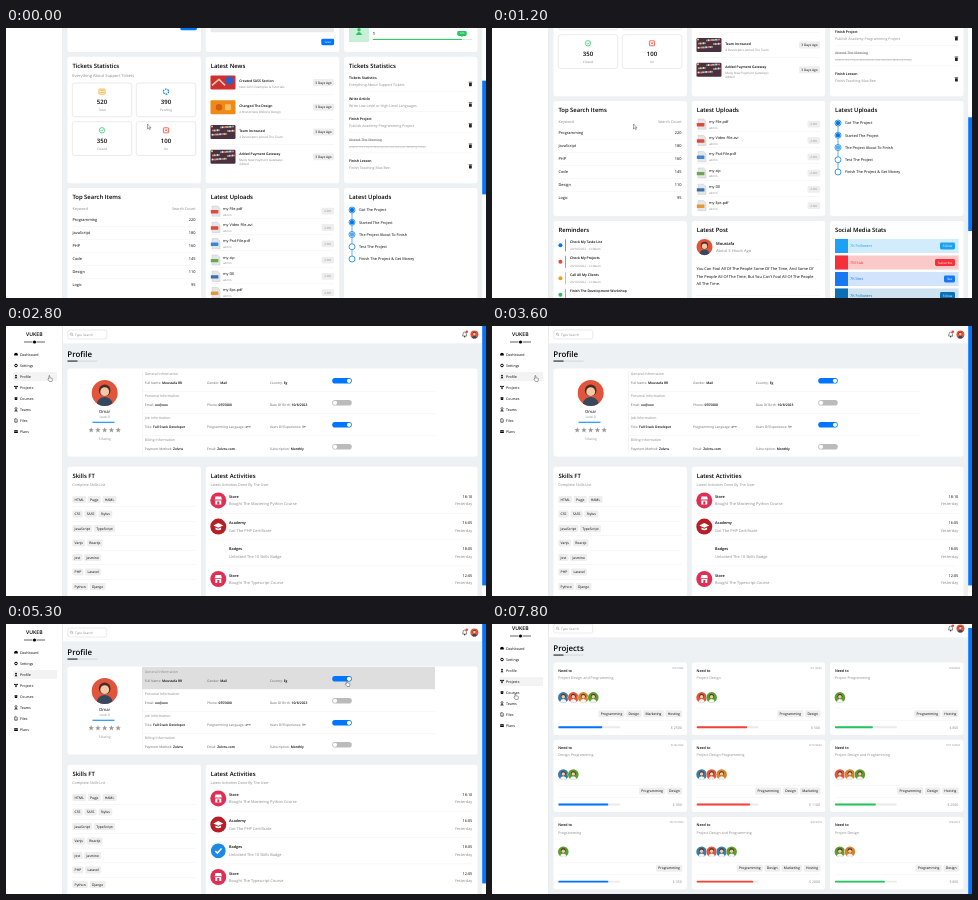
Write an HTML page that moves like this. It is 480 px wide and 270 px high and loops after 8000 ms.

```html
<!DOCTYPE html>
<html lang="en">
<head>
<meta charset="utf-8">
<title>Admin dashboard</title>
<style>
html, body { margin: 0; width: 100%; height: 100%; overflow: hidden; background: #fff; }
svg { display: block; width: 480px; height: 270px; }
text { font-family: "Open Sans", sans-serif; text-rendering: geometricPrecision; }
</style>
</head>
<body>
<svg id="stage" viewBox="0 0 480 270"></svg>
<script>
const BLUE = '#0075ff', RED = '#f44336', ORANGE = '#f59e0b', GREEN = '#22c55e', GREY = '#888', LINE = '#eee';
const COLS = [61.5, 199.8, 338.1], CARD_W = 133.4;
const FACES = { b: '#3a7ca5', r: '#e2553d', o: '#d9822b', g: '#5a9e2f' };
const pen = document.createElement('canvas').getContext('2d');

const textWidth = (s, size, weight = 400) => {
  pen.font = `${weight} 100px "Open Sans", sans-serif`;
  return pen.measureText(s).width * size / 100;
};
// y is the middle of the capitals
const text = (x, y, s, size = 4, fill = '#000', weight = 400, anchor = 'start') =>
  `<text x="${x}" y="${y + size * .36}" font-size="${size}" fill="${fill}" font-weight="${weight}" text-anchor="${anchor}">${s}</text>`;
const bold = (x, y, s, size = 3.4) => text(x, y, s, size, '#000', 600);
const grey = (x, y, s, size = 3.3) => text(x, y, s, size, GREY);
const mid = (x, y, s, size, fill = '#000', weight = 400) => text(x, y, s, size, fill, weight, 'middle');
const end = (x, y, s, size, fill = '#000', weight = 400) => text(x, y, s, size, fill, weight, 'end');
const rect = (x, y, w, h, fill, r = 0, more = '') =>
  `<rect x="${x}" y="${y}" width="${w}" height="${h}" fill="${fill}" rx="${r}" ${more}/>`;
const dot = (x, y, r, fill, more = '') => `<circle cx="${x}" cy="${y}" r="${r}" fill="${fill}" ${more}/>`;
const path = (d, stroke, width = .8, fill = 'none') =>
  `<path d="${d}" stroke="${stroke}" stroke-width="${width}" fill="${fill}"/>`;
const rule = (x, y, w) => rect(x, y, w, .3, '#e6e6e6');
const card = (x, y, w, h) => rect(x, y, w, h, '#fff', 2.5);
const cardTitle = (x, y, s) => bold(x + 4.9, y, s, 5.9);
const pill = (x, y, w, h, fill, s, color = '#fff', size = 3.2) =>
  rect(x, y - h / 2, w, h, fill, 1.4) + mid(x + w / 2, y, s, size, color);
const each = (list, fn) => list.map(fn).join('');

const avatar = (x, y, r, fill, body = '#f3f3f3') =>
  `<g transform="translate(${x} ${y}) scale(${r})">` + dot(0, 0, 1, fill) +
  `<path d="M-.6 .8Q-.5 .3 0 .3Q.5 .3 .6 .8A1 1 0 0 1 -.6 .8" fill="${body}"/>` +
  dot(0, -.2, .45, '#4a2c24') + dot(0, -.1, .34, '#f3c9a5') + '</g>';
const team = (x, y, r, step, codes) =>
  each([...codes], (c, i) => dot(x + i * step, y, r, '#fff') + avatar(x + i * step, y, r - .4, FACES[c]));
const chips = (x, y, list, size = 3.4, fromRight = false) => {
  const widths = list.map(s => textWidth(s, size) + 4.6);
  if (fromRight) x -= widths.reduce((a, b) => a + b + 1.6, -1.6);
  return each(list, (s, i) => {
    const p = pill(x, y, widths[i], 7, '#eee', s, '#000', size);
    x += widths[i] + 1.6;
    return p;
  });
};
const heading = s => bold(61.3, 28, s, 7.9) + rect(61.5, 34.6, 30, .9, '#ccd1d6') + rect(61.5, 34.6, 10, .9, '#000');

function sidebar() {
  const names = ['Dashboard', 'Settings', 'Profile', 'Projects', 'Courses', 'Teams', 'Files', 'Plans'];
  const icons = [
    path('M-1.8 1V0A1.8 1.8 0 0 1 1.8 0V1Z', 'none', 0, '#000'),
    dot(0, 0, 1.3, 'none', 'stroke="#000" stroke-width="1"'),
    dot(0, -.8, .9, '#000') + path('M-1.4 1.7Q0 -.7 1.4 1.7Z', 'none', 0, '#000'),
    path('M-1.2 -1.1H1.2L0 1.1Z', '#000', .6) + dot(-1.2, -1.1, .7, '#000') + dot(1.2, -1.1, .7, '#000') + dot(0, 1.1, .7, '#000'),
    path('M-2.2 -.5L0 -1.5L2.2 -.5L0 .5ZM-1.2 .5V1.4H1.2V.5', 'none', 0, '#000'),
    dot(0, -.9, 1, 'none', 'stroke="#000" stroke-width=".6"') + path('M-1.4 1.6Q0 -.2 1.4 1.6Z', '#000', .6),
    path('M-1.2 -1.7H.5L1.2 -.9V1.7H-1.2Z', '#000', .6),
    rect(-1.9, -1.4, 3.8, 2.8, '#000', .4) + rect(-1.9, -.7, 3.8, .6, '#fff')
  ];
  return rect(0, 0, 57, 700, '#fff') + rect(56.3, 0, .7, 700, '#e2e4e6') +
    mid(28.3, 8.3, 'VUKEB', 5.1, '#000', 600) + rect(18, 15.7, 21, .6, '#000') +
    dot(28.5, 16, 2.2, '#fff') + dot(28.5, 16, 1.6, '#000') +
    `<g id="active">${rect(7.2, 24, 44, 9, '#f3f3f3', 1.5)}</g>` +
    each(names, (s, i) => `<g transform="translate(10 ${28.5 + 11 * i})">${icons[i]}</g>` +
      text(14, 28.5 + 11 * i, s, 3.6, '#000', 500));
}

function header() {
  return rect(57, 0, 420, 17.3, '#fff') + rect(61.8, 4, 39, 9, '#fff', 2, 'stroke="#ccc" stroke-width=".4"') +
    dot(65.4, 8.2, 1.1, 'none', 'stroke="#888" stroke-width=".5"') + path('M66.2 9L67.2 10', GREY, .5) +
    grey(69, 8.5, 'Type Search', 3.2) +
    path('M456.5 10Q457 9.3 457 8A1.7 1.9 0 0 1 460.4 8Q460.4 9.3 460.9 10Z', '#222', .5) + dot(458.7, 10.8, .7, '#222') +
    dot(460.8, 5.8, 1.3, RED) + avatar(468.4, 8.5, 4, '#e2553d', '#34495e');
}

function welcome() {
  const [x] = COLS;
  const person = (px, py, c, legs) => dot(px, py, 1.5, '#e8b08f') + rect(px - 2, py + 1.6, 4, 9, c, 1.5) +
    rect(px - 1.6, py + 10, 1.4, 76.5 - py - 10, legs) + rect(px + .3, py + 10, 1.4, 76.5 - py - 10, legs);
  return card(x, 42.6, CARD_W, 106.5) + rect(x, 42.6, CARD_W, 34.4, '#dfe0e1', 2.5) +
    cardTitle(x, 52, 'Welcome') + grey(66.3, 60.3, 'Omar', 3.3) +
    person(145.5, 54, '#2f6fb0', '#23395d') + person(154, 56, '#3b82c4', '#23395d') +
    rect(149, 64, 28, 1, '#23395d') + path('M152 65L150 76.5M174 65L176 76.5', '#23395d', .6) +
    rect(160, 60, 6, 4, '#fff') + person(172.5, 54, '#d0524a', '#23395d') + person(183, 51.5, '#2f6fb0', '#23395d') +
    path('M146 57L152 62M182 55L175 59', '#e8b08f', 1) +
    dot(74, 78, 7.4, '#fff') + avatar(74, 78, 6.6, '#e2553d', '#34495e') +
    each([[87, 'Moustafa', 'Developer'], [128, '4', 'Projects'], [169, '$500', 'Earned']],
      ([cx, a, b]) => mid(cx, 100, a, 3.9) + mid(cx, 107.3, b, 3.3, GREY)) +
    pill(174.3, 123.7, 16.6, 7, BLUE, 'Profile', '#fff', 3.5);
}

function draft() {
  const x = COLS[1];
  return card(x, 42.6, CARD_W, 106.5) + cardTitle(x, 57, 'Quick Draft') +
    text(204.6, 69, 'Write A Draft For Your Ideas') +
    rect(204.5, 75.5, 123.5, 9, '#e9e9e9', 1.4) + grey(207, 80, 'Title', 3.2) +
    rect(204.5, 89.8, 123.5, 39.5, '#e9e9e9', 1.4) + grey(207, 94, 'write here', 3.2) +
    pill(315.3, 139, 12.8, 6.4, BLUE, 'Save', '#fff', 3);
}

function targets() {
  const x = COLS[2];
  const rows = [[68.5, 'Money', '$82.41', BLUE, '#c6e0ff', 446, '80%', '$'],
    [93.5, 'projects', '4', ORANGE, '#fce7c3', 431.5, '65%', '$'],
    [118.5, 'Team', '1', GREEN, '#c9f0d7', 456, '90%', '']];
  return card(x, 42.6, CARD_W, 106.5) + cardTitle(x, 51.8, 'Yearly Targets') +
    grey(343, 61.2, 'Everything About Support Tickets', 4) +
    each(rows, ([y, label, value, c, tint, stop, pct, sign]) =>
      rect(343, y, 20, 20.5, tint) +
      (sign ? mid(353, y + 10.2, sign, 6, c, 600)
        : dot(353, y + 8.2, 1.7, c) + path(`M349.8 ${y + 13.5}Q353 ${y + 7.5} 356.2 ${y + 13.5}Z`, 'none', 0, c)) +
      grey(366.8, y + 5.7, label, 3.4) + bold(366.8, y + 12.3, value, 4) +
      rect(366.8, y + 17.4, 99.6, 1, tint) + rect(366.8, y + 17.4, stop - 366.8, 1, c) +
      pill(stop - 4.7, y + 12, 9.4, 5, c, pct, '#fff', 2.6) +
      path(`M${stop - 1} ${y + 14.3}h2l-1 1.4Z`, 'none', 0, c));
}

function tickets() {
  const x = COLS[0];
  const icon = [
    rect(-3, -2.5, 6, 5, 'none', .6, `stroke="${ORANGE}" stroke-width=".8"`) + path('M-1.7 -.9H1.8M-1.7 .8H1.8', ORANGE, .8),
    dot(0, 0, 2.6, 'none', `stroke="${BLUE}" stroke-width="1.2" stroke-dasharray="1.7 1"`),
    dot(0, 0, 2.7, 'none', `stroke="${GREEN}" stroke-width=".7"`) + path('M-1.2 0L-.3 .9L1.3 -.9', GREEN),
    rect(-2.6, -2.5, 5.2, 5, 'none', .6, `stroke="${RED}" stroke-width=".8"`) + path('M-1 -1L1 1M1 -1L-1 1', RED)
  ];
  return card(x, 153.8, CARD_W, 126.4) + cardTitle(x, 163.2, 'Tickets Statistics') +
    grey(66.3, 172.5, 'Everything About Support Tickets', 4) +
    each([['520', 'Total'], ['390', 'Pending'], ['350', 'Closed'], ['100', 'Un']], ([n, label], i) => {
      const bx = 66.3 + i % 2 * 64, y = 180 + (i > 1) * 38.7;
      return rect(bx, y, 59.5, 33.8, '#fff', 2.5, 'stroke="#ccc" stroke-width=".4"') +
        `<g transform="translate(${bx + 29.7} ${y + 8.6})">${icon[i]}</g>` +
        mid(bx + 29.7, y + 19, n, 6, '#000', 600) + mid(bx + 29.7, y + 26.7, label, 3.2, GREY);
    });
}

function news() {
  const x = COLS[1];
  const rows = [['Created SASS Section', 'New SASS Examples & Tutorials'], ['Changed The Design', 'A Brand New Website Design'],
    ['Team Increased', '4 Developers Joined The Team'], ['Added Payment Gateway', 'Many New Payment Gateways', 'Added']];
  const hues = ['#e9c46a', '#d95f5f', '#5fa8a0', '#b58ac9', '#e8e0d0'];
  const thumb = (i, y) => rect(204.5, y - 7, 25, 14, ['#d02f2f', '#ef8a17', '#4b3040', '#4b3040'][i], 1.2) +
    (i == 0 ? dot(223.5, y - 2, 4, '#2d5fc4') + path(`M206 ${y + 3}L213 ${y - 3}L219 ${y + 3}`, '#f4c8b8', 1.6)
      : i == 1 ? dot(213, y, 3.2, '#d35d12') + rect(219, y - 3, 6, 6, '#f9bf62', 1)
      : each([...Array(30)], (_, k) => dot(206 + k * 7 % 22.5, y - 5.5 + k * 3.7 % 11, 1, hues[k % 5])));
  return card(x, 153.8, CARD_W, 126.4) + cardTitle(x, 163.2, 'Latest News') +
    each(rows, ([a, b, c], i) => {
      const y = 179.4 + 24.8 * i;
      return thumb(i, y) + bold(233.2, y - 1.2 - (c ? 1.7 : 0), a, 3.4) + grey(233.2, y + 4.4 - (c ? 1.5 : 0), b, 3.1) +
        (c ? grey(233.2, y + 7, c, 3.1) + '' : rule(204.5, y + 12.3, 123.5)) + pill(307, y, 21, 7, '#eee', '3 Days Ago', '#000', 3.2);
    });
}

function todo() {
  const x = COLS[2];
  const rows = [['Tickets Statistics', 'Everything About Support Tickets'], ['Write Article', 'Write Low Level or High Level Languages'],
    ['Finish Project', 'Publish Academy Programming Project'],
    ['Attend The Meeting', 'Attend The Project Brainstorm and Decision Meeting Today'], ['Finish Lesson', 'Finish Teaching Max Bee']];
  return card(x, 153.8, CARD_W, 126.4) + cardTitle(x, 163.2, 'Tickets Statistics') +
    each(rows, ([a, b], i) => {
      const y = 175 + 20.6 * i, done = i == 3;
      return (done ? `<g opacity=".55" text-decoration="line-through">${text(343, y, a, 3.6)}${grey(343, y + 6.7, b, 2.8)}</g>`
        : bold(343, y, a, 3.5) + grey(343, y + 7, b, 3.6)) +
        rect(463, y + 4.8, 2.8, 3.4, '#222', .4) + rect(462.6, y + 3.8, 3.6, .6, '#222') + (i < 4 ? rule(343, y + 13, 123.4) : '');
    });
}

function searches() {
  const rows = [['Programming', 220], ['JavaScript', 180], ['PHP', 160], ['Code', 145], ['Design', 110], ['Logic', 95]];
  return card(COLS[0], 285, CARD_W, 115) + cardTitle(COLS[0], 294, 'Top Search Items') +
    grey(66.5, 305.7, 'Keyword', 3.8) + end(189.5, 305.7, 'Search Count', 3.8, GREY) +
    each(rows, ([a, n], i) => text(66.5, 317 + 13 * i, a, 3.9) + end(189.5, 317 + 13 * i, n, 3.9) +
      (i < 5 ? rule(66.5, 323.5 + 13 * i, 123) : ''));
}

function uploads() {
  const names = ['my File.pdf', 'my Video File.avi', 'my Psd-File.pdf', 'my zip', 'my Dll', 'my Eps.pdf'];
  const hue = ['#e2483d', '#e2483d', '#3a86d6', '#6aa84f', '#3f6fa8', '#e39a35'];
  return card(COLS[1], 285, CARD_W, 115) + cardTitle(COLS[1], 294, 'Latest Uploads') +
    each(names, (s, i) => {
      const y = 305.5 + 16.3 * i;
      return path(`M206 ${y - 2.5}h5.5l2.5 2.4v7.8h-8Z`, '#aaa', .3, '#e4e7ea') + rect(204.8, y + 1.5, 7.6, 3.4, hue[i], .4) +
        text(217, y, s, 3.8) + grey(217, y + 6, 'admin', 2.9) + pill(315.5, y + 2.7, 12.6, 6.8, '#eee', '2.9m', GREY, 3) +
        (i < 5 ? rule(204.5, y + 9.6, 123.5) : '');
    });
}

function steps() {
  const rows = ['Got The Project', 'Started The Project', 'The Project About To Finish', 'Test The Project', 'Finish The Project & Get Money'];
  return card(COLS[2], 285, CARD_W, 115) + cardTitle(COLS[2], 294, 'Latest Uploads') + rect(345.7, 307, .6, 49, BLUE) +
    each(rows, (s, i) => dot(346, 307 + 12.25 * i, 3, '#fff', 'stroke="#0a85e8" stroke-width=".8"') +
      (i < 3 ? dot(346, 307 + 12.25 * i, 2.2, i < 2 ? '#0a75e0' : '#57a8f2') : '') + text(353, 307 + 12.25 * i, s, 3.8));
}

function reminders() {
  const rows = [['Check My Tasks List', BLUE], ['Check My Projects', RED], ['Call All My Clients', ORANGE], ['Finish The Development Workshop', GREEN]];
  return card(COLS[0], 405, CARD_W, 90) + cardTitle(COLS[0], 414, 'Reminders') +
    each(rows, ([s, c], i) => {
      const y = 429.3 + 16.5 * i;
      return dot(68.4, y, 2, c) + rect(73, y - 6, .7, 12, c) + bold(78, y - 3.6, s, 3.4) + grey(78, y + 3.8, '20/10/2022 - 12:00am', 3);
    });
}

function post() {
  const lines = ['You Can Fool All Of The People Some Of The Time, And Some Of', 'The People All Of The Time, But You Can\'t Fool All Of The People', 'All The Time.'];
  return card(COLS[1], 405, CARD_W, 90) + cardTitle(COLS[1], 414, 'Latest Post') +
    avatar(212.5, 431, 8, '#e2553d', '#34495e') + bold(224, 428, 'Moustafa', 4) + grey(224, 434.7, 'About 3 Hours Ago', 4) +
    rule(204.5, 443.5, 123.5) + each(lines, (s, i) => text(204.5, 453 + 7.2 * i, s, 3.95)) + rule(204.5, 479.5, 123.5) +
    path('M206.3 487.8L204.7 486Q204.7 484.2 206.3 485.2Q207.9 484.2 207.9 486Z', GREY, .4) + grey(210, 486.3, '1.8k', 3.5) +
    dot(317.5, 486.2, 1.6, 'none', 'stroke="#888" stroke-width=".5"') + end(328, 486.3, '500', 3.5, GREY);
}

function social() {
  const rows = [['#1da1f2', '#d2ecfc', '7K Followers', 'Follow', 15], ['#f5303a', '#fcc9c9', '7M Sub', 'Subscribe', 20],
    ['#1877f2', '#d1e4fc', '7K likes', 'like', 11], ['#0a6fb5', '#cee2f0', '7K Followers', 'Follow', 15]];
  return card(COLS[2], 405, CARD_W, 90) + cardTitle(COLS[2], 414, 'Social Media Stats') +
    each(rows, ([c, tint, s, label, w], i) => {
      const y = 423 + 16.5 * i;
      return rect(343, y, 123.6, 14, tint) + rect(343, y, 13, 14, c) + text(358, y + 7, s, 3.8, c) +
        pill(463 - w, y + 7, w, 6.8, c, label, '#fff', 3.2);
    });
}

function projectTable() {
  const xs = [70, 161.3, 230.6, 301.5, 344, 397.5];
  const state = { Pending: [ORANGE, 20], 'In Progress': [BLUE, 24.5], Completed: [GREEN, 24.5], Rejected: [RED, 23] };
  const first = ['Bureau Encyclora', '10 May 2022', 'Bureau', '$1300'];
  const rows = [[...first, 'bgr', 'Pending'], ['Moustafa El', '12 May 2021', 'VK Company', '$1200', 'bgr', 'In Progress'],
    ['Omar Salef', '05 sep 2022', 'Tilmo', '$1800', 'rb', 'Completed'], [...first, 'bgr', 'Completed'],
    [...first, 'gr', 'Rejected'], [...first, 'gr', 'Completed']];
  return card(61.5, 500, 410, 136) + cardTitle(61.5, 509, 'projects') + rect(66.3, 518, 400, 12.6, '#ececec') +
    each(['Name', 'Finish Date', 'Client', 'Price', 'Team', 'Status'], (s, i) => bold(xs[i], 524.3, s, 3.6)) +
    each(rows, (row, i) => {
      const y = 539 + 16.7 * i, [c, w] = state[row[5]];
      return each(row.slice(0, 4), (s, k) => text(xs[k], y, s, 3.6)) + team(348.4, y, 4.3, 3.8, row[4]) +
        pill(397.5, y, w, 7, c, row[5], '#fff', 3.4) + rule(66.3, y + 8.3, 400);
    });
}

function profileInfo() {
  const rows = [
    ['General Information', 1, 'Full Name: |Moustafa RR', 'Gender: |Mail', 'Country: |Eg'],
    ['Personal Information', 0, 'Email: |oo@oox', 'Phone: |0555000', 'Date Of Birth: |10/8/2023'],
    ['Job Information', 1, 'Title: |Full Stack Developer', 'Programming Language: |c++', 'Years Of Experience: |1+'],
    ['Billing Information', 0, 'Payment Method: |Zolvru', 'Email: |Zolvru.com', 'Subscription: |Monthly']];
  return card(61.5, 42.6, 410, 88) + `<g id="hover">${rect(136, 43, 293, 22, '#dedede')}</g>` +
    avatar(98.7, 67, 13, '#e2553d', '#34495e') + mid(98.7, 85, 'Omar', 4.2) + mid(98.7, 90.8, 'Level 0', 3.3, GREY) +
    rect(86.5, 95.7, 22, 1.2, '#2196f3') +
    each([0, 1, 2, 3, 4], i => `<path transform="translate(${85.2 + 6.75 * i} 104)" fill="#999" d="M0 -2.7L.8 -.8L2.7 -.7L1.2 .5L1.7 2.4L0 1.3L-1.7 2.4L-1.2 .5L-2.7 -.7L-.8 -.8Z"/>`) +
    mid(98.7, 113, '5 Rating', 3.2, GREY) + rect(136, 45, .3, 83, '#ddd') +
    each(rows, ([title, on, ...cells], i) => {
      const y = 47.6 + 22 * i;
      return grey(138.8, y, title, 3.5) +
        each(cells, (s, k) => {
          const [label, value] = s.split('|');
          return text([138.8, 201, 263.7][k], y + 9.6, `<tspan fill="#666">${label}</tspan><tspan font-weight="600">${value}</tspan>`, 3.3);
        }) + rect(326.2, y + 4.4, 19.6, 5.6, on ? BLUE : '#bbb', 2.8) +
        dot(on ? 343 : 329, y + 7.2, 2.1, '#fff') + (i < 3 ? rule(136, y + 17.4, 293) : '');
    });
}

function profileLists() {
  const skills = ['HTML Pugjs HAML', 'CSS SASS Stylus', 'JavaScript TypeScript', 'Vanjs Reactjs', 'Jest Jasmine', 'PHP Laravel', 'Python Django'];
  const acts = [['Store', 'Bought The Mastering Python Course', '18:10'], ['Academy', 'Got The PHP Certificate', '16:05'],
    ['Badges', 'Unlocked The 10 Skills Badge', '18:05'], ['Store', 'Bought The Typescript Course', '12:05']];
  const shop = dot(0, 0, 8, '#df2f54') + path('M-3.6 -.8L-2.8 -4H2.8L3.6 -.8ZM-3 0H3V4H-3Z', 'none', 0, '#fff') + rect(-1, 1, 2, 3, '#df2f54');
  const cap = dot(0, 0, 8, '#b71f26') + path('M-5 -1.2L0 -3.6L5 -1.2L0 1.2ZM-2.8 .8L0 2.2L2.8 .8V2.8Q0 4.4 -2.8 2.8Z', 'none', 0, '#fff');
  const tick = `<g id="badge">${dot(0, 0, 7.4, '#1e88e5')}${path('M-3 .2L-.9 2.3L3.2 -2.2', '#fff', 1.5)}</g>`;
  return card(61.5, 140.8, CARD_W, 135) + cardTitle(61.5, 150, 'Skills FT') + grey(66.3, 159, 'Complete Skills List', 3.7) +
    each(skills, (s, i) => chips(66.3, 173.5 + 14.5 * i, s.split(' ')) + (i < 6 ? rule(66.3, 180.7 + 14.5 * i, 123.5) : '')) +
    card(COLS[1], 140.8, 271.7, 135) + cardTitle(COLS[1], 150, 'Latest Activities') +
    grey(204.5, 159, 'Latest Activities Done By The User', 3.7) +
    each(acts, ([a, b, time], i) => {
      const y = 174.4 + 26.2 * i;
      return `<g transform="translate(212.3 ${y})">${[shop, cap, tick, shop][i]}</g>` + bold(223, y - 3.7, a, 3.8) + grey(223, y + 3.5, b, 3.9) +
        end(466.3, y - 3.7, time, 3.8, '#000', 500) + end(466.3, y + 3.5, 'Yesterday', 3.9, GREY) + (i < 3 ? rule(204.5, y + 13, 262) : '');
    });
}

function projectCards() {
  const P = 'Programming', D = 'Design', M = 'Marketing', H = 'Hosting', full = 'Project Design and Programming';
  const items = [
    [full, 'brog', [P, D, M, H], 44, 2500, '9/1/2022'], ['Project Design', 'rg', [P, D], 50.5, 500, '9/1/2022'],
    ['Project Programming', 'g', [P, H], 38, 800, '9/3/2022'],
    ['Design Programming', 'bg', [P, D], 50, 900, '9/14/2022'], ['Project Design Programming', 'bro', [P, D, M], 53.5, 1100, '9/13/2022'],
    [full, 'rog', [P, D, H], 41, 2500, '10/11/2022'],
    ['Programming', 'g', [P], 50, 350, '10/11/2022'], [full, 'brbg', [P, D, M, H], 56.5, 2000, '9/9/2019'],
    ['Project Design', 'go', [P, D], 50, 800, '9/9/2019']];
  return each(items, ([s, faces, tags, done, price, date], i) => {
    const c = i % 3, x = COLS[c], y = 42.6 + 77.2 * (i / 3 | 0), l = x + 4.8, r = x + 128.7;
    return card(x, y, CARD_W, 72.3) + bold(l, y + 7.9, 'Need to', 3.6) + end(r + 1.3, y + 5.2, date, 2.7, GREY) +
      grey(l, y + 15.3, s, 3.6) + team(x + 9.8, y + 34.8, 5.7, 10, faces) + rule(l, y + 45.3, 124) +
      chips(r, y + 51.2, tags, 3.4, true) + rule(l, y + 57.5, 124) +
      rect(l, y + 63.7, 62, 1.9, '#eaeaea', .9) + rect(l, y + 63.7, done, 1.9, [BLUE, RED, GREEN][c], .9) +
      end(r - .5, y + 64.7, '$ ' + price, 3.5, GREY);
  });
}

const views = [
  heading('Dashboard') + welcome() + draft() + targets() + tickets() + news() + todo() + searches() + uploads() + steps() +
    reminders() + post() + social() + projectTable(),
  heading('Profile') + profileInfo() + profileLists(),
  heading('Projects') + projectCards()
];
const $ = id => document.getElementById(id);
$('stage').innerHTML = rect(0, 0, 480, 270, '#edf1f4') +
  `<g id="page">${sidebar()}${header()}${each(views, (v, i) => `<g id="view${i}">${v}</g>`)}</g>` +
  rect(476.2, 0, 3.8, 270, '#fff') + `<rect id="thumb" x="476.2" width="3.8" fill="${BLUE}"/>` +
  `<g id="cursor"><g id="arrow">${path('M0 0V5L1.2 3.9L2 5.6L2.8 5.2L2 3.6H3.5Z', '#222', .4, '#fff')}</g>` +
  `<g id="hand">${path('M.5 0Q1.2 -.2 1.3 .6V2.3L3.6 2.8Q4 3 3.9 4L3.4 6H1L-.8 3.6Q-.6 2.8 .4 3.6V.5Z', '#222', .4, '#fff')}</g></g>`;

// rows of [time, value, ...], linear in between
function track(keys, t) {
  const k = keys.findIndex(key => key[0] > t);
  if (k < 0) return keys.at(-1).slice(1);
  if (!k) return keys[0].slice(1);
  const a = keys[k - 1], b = keys[k], p = (t - a[0]) / (b[0] - a[0]);
  return a.slice(1).map((v, i) => v + (b[i + 1] - v) * p);
}
const scrolls = [
  [[0, 125], [600, 371], [900, 371], [1600, 0]],
  [[3700, 0], [4000, 11], [4600, 11], [4900, 0]],
  [[6900, 0], [7200, 4]]
];
const pointer = [[0, 141.5, 96], [1500, 141.5, 96], [2000, 33, 39.5], [2200, 33, 39.5], [2600, 42.5, 49.5], [3800, 42.5, 49.5],
  [4500, 200, 95], [5100, 340, 56.5], [5400, 340, 56.5], [5900, 190, 72], [6300, 45, 54], [6500, 31.5, 63.5], [6900, 31.5, 63.5], [7800, 22.5, 69.5]];
const heights = [641, 281, 274], activeItem = [0, 2, 3];
const show = (id, on) => $(id).setAttribute('display', on ? 'inline' : 'none');

function draw() {
  const now = performance.now() % 8000, t = now - now % 100;
  const view = t < 2600 ? 0 : t < 6400 ? 1 : 2;
  const [scroll] = track(scrolls[view], t), [x, y] = track(pointer, t);
  const onLink = x < 52 || t >= 5000 && t < 5500;
  views.forEach((_, i) => show('view' + i, i == view));
  show('hover', t >= 5000 && t < 5500);
  show('badge', t >= 3800);
  show('hand', onLink);
  show('arrow', !onLink);
  $('page').setAttribute('transform', `translate(0 ${-scroll})`);
  $('active').setAttribute('transform', `translate(0 ${11 * activeItem[view]})`);
  $('thumb').setAttribute('y', scroll * 270 / heights[view]);
  $('thumb').setAttribute('height', 270 * 270 / heights[view]);
  $('cursor').setAttribute('transform', `translate(${x} ${y})`);
  requestAnimationFrame(draw);
}
draw();
</script>
</body>
</html>
```
